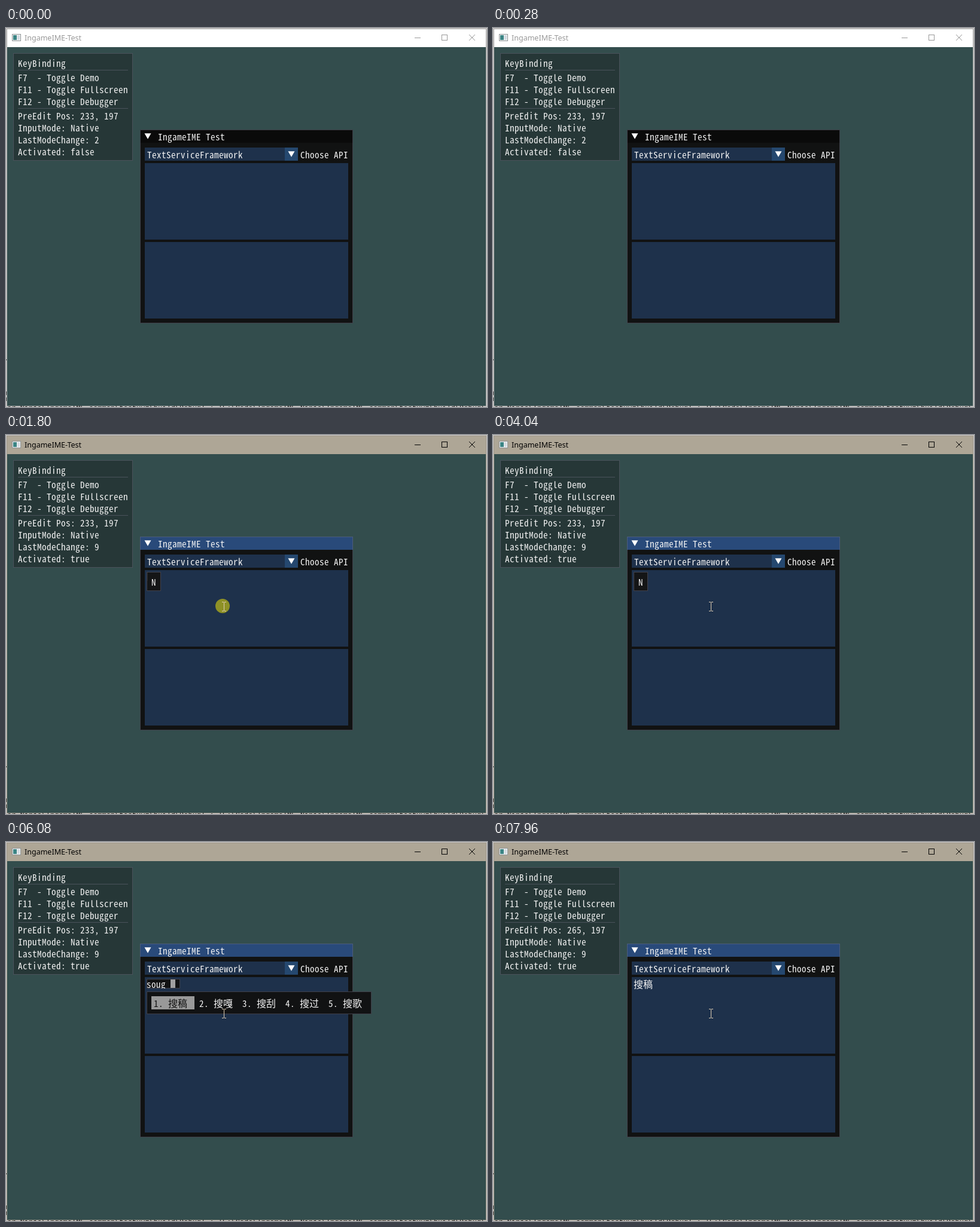
Animation of 804x634 px, one loop 8000 ms. Source, as an HTML page:

```html
<!DOCTYPE html>
<html lang="zh-CN">
<head>
<meta charset="utf-8">
<title>IngameIME-Test</title>
<style>
html, body { margin: 0; width: 100%; height: 100%; overflow: hidden; }
svg { display: block; }
#stage { width: 804px; height: 634px; }
text { font: 15px "Noto Sans Mono CJK SC", "Noto Sans Mono", monospace; letter-spacing: .5px; fill: #f4f4f4; white-space: pre; }
.han { font-size: 16px; letter-spacing: 0; }
#caption { font: 12.5px "Noto Sans", "Open Sans", sans-serif; letter-spacing: 0; fill: currentColor; }
#behind { font: 12px "Liberation Mono", monospace; letter-spacing: 0; fill: #222; }
.crisp { shape-rendering: crispEdges; }
.field { fill: #1e314b; }
.popup { fill: #111213; }
.edge { fill: none; stroke: #6e6e80; stroke-opacity: .5; }
.dark { fill: #111; }
</style>
</head>
<body>
<svg id="stage" viewBox="0 0 804 634">
  <g class="crisp">
    <rect width="804" height="634" fill="#d0cccb"/>
    <rect id="rim" x="1" y="1" width="802" height="632"/>
    <rect id="bar" x="2" y="2" width="800" height="30"/>
    <rect x="2" y="32" width="800" height="600" fill="#334d4d"/>
    <path d="M0 608v6M0 618v6M0 555h1" stroke="#444" stroke-width="2"/>
  </g>
  <svg y="632" width="804" height="2">
    <text id="behind" x="2" y="8">or Ninja\IngameIME common\testxyz\build\Debug' : 'E:\Code\IngameIME Ninja\IngameIME common\testxyz\build\Debug\Ingame</text>
  </svg>

  <g class="crisp">
    <rect x="10.5" y="10.5" width="14" height="11" fill="#f4f4f4" stroke="#8d9496"/>
    <rect x="12" y="12" width="6" height="8" fill="#3c8585"/>
    <rect x="19" y="12" width="4" height="8" fill="#d3dbe2"/>
  </g>
  <g id="chrome">
    <text id="caption" x="31" y="21">IngameIME-Test</text>
    <path d="M683 16.5h10M728.5 11.5h9v9h-9z" fill="none" stroke="currentColor" class="crisp"/>
    <path d="M774 11l10 10M784 11l-10 10" stroke="currentColor"/>
  </g>

  <g class="crisp">
    <rect x="12" y="42" width="200" height="180" fill="#263737"/>
    <rect class="edge" x="12.5" y="42.5" width="199" height="179"/>
    <path class="edge" d="M20 70.5h184M20 134.5h184"/>
  </g>
  <g id="info"></g>

  <g class="crisp">
    <rect x="224" y="170" width="356" height="324" fill="#111212"/>
    <rect id="head" x="224" y="170" width="356" height="22"/>
    <rect class="edge" x="224.5" y="170.5" width="355" height="323"/>
    <rect class="field" x="232" y="200" width="234" height="22"/>
    <rect x="466" y="200" width="22" height="22" fill="#25486f"/>
    <rect class="field" x="232" y="226" width="340" height="128"/>
    <rect class="field" x="232" y="358" width="340" height="128"/>
  </g>
  <path d="M231.5 176.2h11l-5.5 9.6zM471.5 206.2h11l-5.5 9.6z" fill="#fff"/>
  <text x="254" y="188">IngameIME Test</text>
  <text x="236" y="218">TextServiceFramework</text>
  <text x="492" y="218">Choose API</text>

  <text id="typed" class="han" x="235" y="244">搜稿</text>
  <rect id="caret" class="crisp" y="230" width="1" height="14" fill="#fff"/>

  <g id="mode">
    <rect class="crisp" x="235" y="229" width="24" height="32" fill="#141414" fill-opacity=".94"/>
    <rect class="edge crisp" x="235.5" y="229.5" width="23" height="31"/>
    <text x="243" y="252">N</text>
  </g>
  <g id="compose"></g>

  <circle id="click" cx="362" cy="286" r="12" fill="#8e9126"/>
  <path id="arrow" d="M.5 .5v16l3.7-3.5 2.4 5.6 2.4-1-2.4-5.4h5z" fill="#fff" stroke="#000"/>
  <path id="beam" class="crisp" d="M-3 -7.5h3M1 -7.5h3M.5 -7v14M-3 7.5h3M1 7.5h3" fill="none" stroke="#e1cfb5"/>
</svg>
<script>
const LOOP = 8000;
const FOCUS = 1800, TYPE = 4800, COMMIT = 6920;
const MOVE = { start: 560, end: 1120, steps: 10, from: [545, 569], to: [364, 287] };
const STEPS = [
  [5160, 's', ['是', '使', '时', '上', '\uFFFD']],
  [5560, 'so', ['所', '搜', '索', '锁', '缩']],
  [5840, 'sou', ['搜', '艘', '嗽', '馊', '嗖']],
  [6080, 'soug', ['搜稿', '搜嘎', '搜刮', '搜过', '搜歌']],
];
const ROWS = [60, 84, 104, 124, 148, 168, 188, 208];

const $ = id => document.getElementById(id);
const show = (id, on) => $(id).setAttribute('visibility', on ? 'visible' : 'hidden');
const fill = (id, color) => $(id).setAttribute('fill', color);
const label = (x, y, s, cls = '') => `<text x="${x}" y="${y}" class="${cls}">${s}</text>`;
const box = (x, y, w, h, attrs) => `<rect x="${x}" y="${y}" width="${w}" height="${h}" ${attrs}/>`;
const frame = (x, y, w, h) => box(x, y, w, h, 'class="popup crisp"') +
  box(x + .5, y + .5, w - 1, h - 1, 'class="edge crisp"');

function preedit(s) {
  const end = 8 * s.length;
  const w = end + 24;
  // the small window cuts off descenders
  return `<svg x="235" y="229" width="${w}" height="16">` +
    frame(0, 0, w, 16) + label(0, 15, s) +
    box(end + 8, 1, 8, 14, 'fill="#a0a0a0"') + '</svg>';
}

function candidates(list) {
  const pitch = 40 + 16 * list[0].length;
  const last = list[4] === '\uFFFD' ? 8 : 16 * list[4].length;
  const right = 251 + 4 * pitch + 24 + last + 15;
  let out = frame(235, 250, right - 235 + 1, 38) + box(243, 258, pitch, 22, 'fill="#999"');
  list.forEach((word, i) => {
    const x = i ? 251 + pitch * i : 247;
    const cls = i ? '' : 'dark';
    out += label(x, 276, `${i + 1}. `, cls);
    out += word === '\uFFFD'
      ? box(x + 25, 265, 6, 11, 'fill="#fff"') +
        `<text x="${x + 25.5}" y="274" class="dark" style="font-size:10px;font-weight:bold">?</text>`
      : label(x + 24, 276, word, cls + ' han');
  });
  return out;
}

function infoLines(t) {
  const on = t >= FOCUS;
  return ['KeyBinding', 'F7  - Toggle Demo', 'F11 - Toggle Fullscreen', 'F12 - Toggle Debugger',
    `PreEdit Pos: ${t >= COMMIT ? 265 : 233}, 197`, 'InputMode: Native',
    `LastModeChange: ${on ? 9 : 2}`, `Activated: ${on}`];
}

const cache = {};
function setHTML(id, html) {
  if (cache[id] !== html) $(id).innerHTML = cache[id] = html;
}

function pointer(t) {
  const { start, end, steps, from, to } = MOVE;
  const span = Math.min(1, Math.max(0, (t - start) / (end - start)));
  const p = Math.floor(span * (steps - 1) + 1e-6) / (steps - 1);
  const eased = p * p * (3 - 2 * p);
  return from.map((v, i) => Math.round(v + (to[i] - v) * eased));
}

function caretOn(t) {
  if (t < FOCUS || t >= 7960) return false;
  if (t >= COMMIT) return true;
  if (t >= STEPS[0][0]) return false;
  // blink: 800 ms on, 400 ms off
  return t < 2840 || (t - 2840) % 1200 >= 400;
}

function draw(t) {
  const on = t >= FOCUS;
  fill('rim', on ? '#9d978a' : '#a6a8a8');
  fill('bar', on ? '#aea696' : '#fff');
  fill('head', on ? '#294a7a' : '#0a0a0a');
  $('chrome').style.color = on ? '#000' : '#999';
  setHTML('info', infoLines(t).map((s, i) => label(20, ROWS[i] + 5, s)).join(''));

  show('typed', t >= COMMIT);
  $('caret').setAttribute('x', t >= COMMIT ? 268 : 236);
  show('caret', caretOn(t));
  show('mode', on && t < TYPE);

  const step = t < COMMIT && STEPS.filter(s => t >= s[0]).pop();
  setHTML('compose', step ? preedit(step[1]) + candidates(step[2]) : '');

  const [x, y] = pointer(t);
  const overField = y < 354 || (y >= 358 && y < 486);
  const shown = t >= MOVE.start;
  for (const id of ['arrow', 'beam']) $(id).setAttribute('transform', `translate(${x} ${y})`);
  show('arrow', shown && !overField);
  show('beam', shown && overField);
  show('click', on && t < 1880);
}

function tick() {
  draw(performance.now() % LOOP);
  requestAnimationFrame(tick);
}
tick();
</script>
</body>
</html>
```
